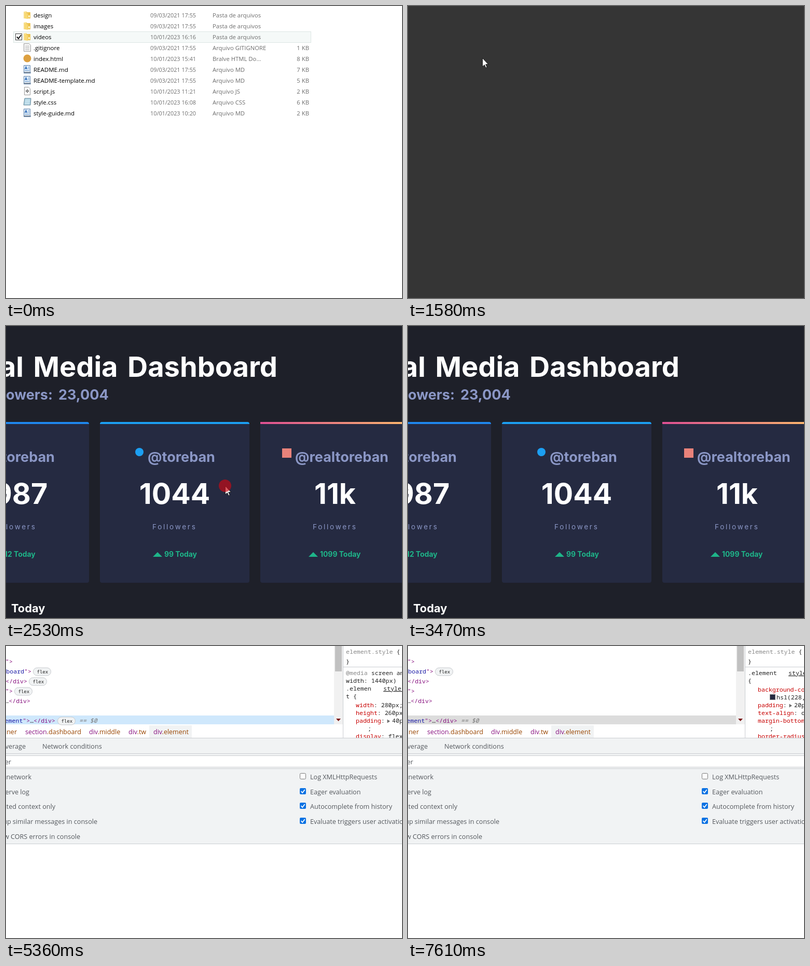
These frames come from a looping animation (763 px wide and 563 px high, 8 s). An HTML page:

```html
<!DOCTYPE html>
<html lang="en">
<head>
<meta charset="utf-8">
<title>Opening a page and its inspector</title>
<style>
html, body { margin: 0; width: 100%; height: 100%; overflow: hidden; background: #fff; }
svg { display: block; }
text { white-space: pre; font-family: "Open Sans", "Noto Sans", sans-serif; }
.name { font-size: 11.5px; }
.date { font-size: 10.85px; fill: #6d6d6d; }
.kind { font-size: 11.3px; fill: #6d6d6d; }
#page text { font-family: Inter, sans-serif; font-weight: 700; fill: #fff; }
#page .title { font-size: 54.2px; }
#page .big { font-size: 55.5px; }
#page .handle { font-size: 27px; fill: #8b97c6; }
#page .label { font-size: 13.5px; font-weight: 400; letter-spacing: 2.75px; fill: #8b97c6; }
#page .up { font-size: 13.9px; fill: #1eb589; }
#page .sub { font-size: 21.8px; }
.item { font-size: 12.2px; fill: #222; }
.ui { font-size: 12.6px; fill: #55595e; }
.crumb { font-size: 12.5px; }
#dev .code { font: 11.6px "Noto Sans Mono", "DejaVu Sans Mono", monospace; fill: #222; }
#dev .pill { font: 9px "DejaVu Sans Mono", monospace; fill: #222; }
#dev .ref { fill: #777; font-style: italic; }
#dev .dim { fill: #888; }
.tag { fill: #881280; }
.val { fill: #1a1aa6; }
.cls { fill: #994500; }
.prop { fill: #c80000; }
.end { text-anchor: end; }
.mid { text-anchor: middle; }
</style>
</head>
<body>
<svg id="stage" width="763" height="563" viewBox="0 0 763 563"></svg>
<script>
const LOOP = 8000;
const stage = document.getElementById('stage');
const text = (x, y, s, cls) => `<text x="${x}" y="${y}" class="${cls}">${s}</text>`;
const rect = (x, y, w, h, fill, more = '') =>
  `<rect x="${x}" y="${y}" width="${w}" height="${h}" fill="${fill}" ${more}/>`;
const span = (cls, s) => `<tspan class="${cls}">${s}</tspan>`;
const group = (id, s) => `<g id="${id}">${s}</g>`;
const line = (y, x = 0, w = 763) => rect(x, y, w, 1, '#cacdd1');

// File list
const icons = {
  dir: '<path d="M1 2l6-1v14H1z" fill="#f8df8d"/><path d="M6 3h8v12H6z" fill="#ecc24f"/><path d="M3 4l6 1v11l-6-1z" fill="#f7d873"/><path d="M10 9h3v4h-3z" fill="#fff3c4"/>',
  txt: '<path d="M1.5 .5h10l3 3v12h-13z" fill="#f6f6f6" stroke="#9a9a9a"/><path d="M4 5h8M4 7.5h8M4 10h8M4 12.5h8" stroke="#b9b9b9"/>',
  web: '<circle cx="8" cy="8" r="7.5" fill="#dda03f"/>',
  md: '<path d="M1.5 .5h12v11l1 4h-13z" fill="#e4f0fb" stroke="#5a7fa8"/><path d="M3.5 8l2-5 2 5M4.3 6.5h2.5" fill="none" stroke="#2464b4" stroke-width="1.3"/><path d="M9 4h3M9 7h3M3 10.5h9" stroke="#5c8dc4"/><path d="M2 13h12v2H2z" fill="#87919c"/>',
  js: '<path d="M2.5 .5h8l3 3v12h-11z" fill="#fff" stroke="#999"/><path d="M8 5v6M5 8h6" stroke="#555" stroke-width="2"/><circle cx="8" cy="8" r="1" fill="#fff"/>',
  css: '<path d="M3 1h12l-1 13H1z" fill="#a8cfe0" stroke="#6a8b9c"/><path d="M4 4h9M4 6.5h9M3.5 9h9M3.5 11.5h9" stroke="#e6f5fb"/>'
};
const old = '09/03/2021 17:55', day = '10/01/2023 ';
const files = [
  ['dir', 'design', old, 'Pasta de arquivos', ''],
  ['dir', 'images', old, 'Pasta de arquivos', ''],
  ['dir', 'videos', day + '16:16', 'Pasta de arquivos', ''],
  ['txt', '.gitignore', old, 'Arquivo GITIGNORE', '1 KB'],
  ['web', 'index.html', day + '15:41', 'Bralve HTML Do...', '8 KB'],
  ['md', 'README.md', old, 'Arquivo MD', '7 KB'],
  ['md', 'README-template.md', old, 'Arquivo MD', '5 KB'],
  ['js', 'script.js', day + '11:21', 'Arquivo JS', '2 KB'],
  ['css', 'style.css', day + '16:08', 'Arquivo CSS', '6 KB'],
  ['md', 'style-guide.md', day + '10:20', 'Arquivo MD', '2 KB']
];
const rowY = i => 18 + 21 * i;
const fileRow = ([icon, name, date, kind, size], i) => {
  const y = rowY(i) + 4;
  return `<g transform="translate(33 ${y - 13})">${icons[icon]}</g>` + text(53, y, name, 'name') +
    text(278, y, date, 'date') + text(398, y, kind, 'kind') + text(584, y, size, 'kind end');
};
const mark = (fill, edge, box, tick) =>
  rect(14.5, -10.5, 573, 21, fill, `stroke="${edge}"`) +
  rect(18.5, -6.5, 12, 12, '#fff', `stroke="${box}"`) +
  (tick ? `<path d="M21 -.5l3 3.5 5-7" fill="none" stroke="${tick}" stroke-width="2"/>` : '');
const place = (id, i, s) => `<g id="${id}" transform="translate(0 ${rowY(i)})">${s}</g>`;

const fileView = group('files',
  place('focus', 2, mark('#f5f9f8', '#dde6e4', '#444', '#111')) +
  place('hover', 4, mark('#e5f3fb', '#70c0e7', '#8fb4d0')) +
  place('chosen', 4, mark('#d0e7fe', '#66a7e8', '#3c7fb1', '#2a5c8f')) +
  files.map(fileRow).join(''));

// Dashboard
const card = (x, bar, handle, hx, total, todayX, today, r = 4) => {
  const cx = x + 144;
  return rect(x, 185, 288, 310, '#252a41', 'rx="4"') +
    `<path d="M${x} 189v-${4 - r}q0-${r} ${r}-${r}h${288 - 2 * r}q${r} 0 ${r} ${r}v${4 - r}z" fill="${bar}"/>` +
    text(hx, 262, handle, 'handle mid') + text(cx, 343, total, 'big mid') +
    text(cx - 43, 392, 'Followers', 'label') +
    `<path d="M${todayX - 22} 445l9-9 9 9z" fill="#1eb589"/>` + text(todayX, 445, today + ' Today', 'up');
};
const pageView = group('page',
  '<linearGradient id="warm" gradientUnits="userSpaceOnUse" x1="490" x2="778"><stop stop-color="#df4f93"/><stop offset="1" stop-color="#fdbb6c"/></linearGradient>' +
  rect(0, 0, 763, 563, '#1e2029') +
  text(34, 98, 'Social', 'title end') + text(51 + 2, 98, 'Media', 'title').replace('53', '52.5') + text(234, 98, 'Dashboard', 'title') +
  text(90, 142, 'Total Followers:', 'handle end') + text(101, 142, '23,004', 'handle') +
  card(-128, '#1f87ee', '@toreban', 29, '1987', -3, '12') +
  card(181, '#1c9ff2', '@toreban', 338, '1044', 305, '99') +
  card(490, 'url(#warm)', '@realtoreban', 647, '11k', 605, '1099', 0) +
  '<circle cx="257" cy="243" r="8" fill="#1c9ff2"/>' + rect(532, 236, 18, 18, '#e9827a') +
  text(10, 552, 'Today', 'sub'));

const items = ['Voltar', 'Avançar', 'Recarregar', 'Salvar como...', 'Imprimir...',
  'Transmitir...', 'Traduzir para o português', 'Ver código-fonte da página', 'Inspecionar', ''];
const menuView = group('menu',
  rect(422.5, 308.5, 380, 300, '#fff', 'stroke="#bababa"') + rect(423, 0, 379, 24, '#e8e8e9', 'id="pick"') +
  items.map((s, i) => text(456, 330 + 25 * i, s, 'item')).join(''));

// Inspector
const badge = (x, y) => rect(x - .5, y - 7, 34, 15, '#f1f3f4', 'rx="7.5" stroke="#c6c9cd"') +
  text(x + 6.5, y + 4, 'flex', 'pill');
const close = span('tag', '&lt;/div&gt;'), quote = span('tag', '"&gt;');
const code = (x, y, s, cls = '') => text(x, y, s, 'code ' + cls);
const prop = (y, name, value = '') => code(674, y, span('prop', name) + value);
const arrow = y => `<path d="M734.5 ${y - 7}v7l5.5-3.5z" fill="#6e6e6e"/>`;
const crumb = (x, tag, cls) => text(x, 170, span('tag', tag) + span('cls', cls), 'crumb');
const check = (y, on) => on
  ? rect(566, y - 6, 12, 12, '#0b72e3', 'rx="2"') + `<path d="M568.5 ${y}l2.7 3 4.5-6" fill="none" stroke="#fff" stroke-width="1.8"/>`
  : rect(566.5, y - 5.5, 11, 11, '#fff', 'rx="2" stroke="#767676"');
const options = [
  ['Hide network', 49, 'Log XMLHttpRequests'],
  ['Preserve log', 45, 'Eager evaluation'],
  ['Selected context only', 95, 'Autocomplete from history'],
  ['Group similar messages in console', 176, 'Evaluate triggers user activation'],
  ['Show CORS errors in console', 143, '']
];
const drawer =
  rect(0, 178, 763, 204, '#f1f3f4') + rect(0, 212, 763, 22, '#fff') +
  line(177) + line(207) + line(211) + line(233) + line(236) + line(381) +
  text(38, 198, 'Coverage', 'ui end') + text(70, 198, 'Network conditions', 'ui') +
  text(10, 228, 'Filter', 'ui end') +
  options.map(([left, x, right], i) => {
    const y = 257 + Math.round(28.7 * i);
    return text(x, y, left, 'ui end') + (right && text(586, y, right, 'ui') + check(y - 6, i > 0));
  }).join('');
const tree =
  rect(0, 134, 632, 17, '#cfe8fc', 'id="row"') +
  code(13, 34, quote, 'end') +
  code(49, 53, span('val', 'board') + quote, 'end') +
  code(41, 72, close, 'end') + code(13, 91, quote, 'end') +
  code(47, 110, '…' + close, 'end') +
  code(95, 148, span('val', 'ement') + quote + '…' + close, 'end') +
  group('ref', code(0, 148, '== $0', 'ref')) +
  rect(632, 0, 17, 151, '#f1f1f1') + rect(634, 0, 13, 49, '#c1c1c1') +
  '<path d="M636 140h9l-4.5 5z" fill="#7a1515"/>' +
  rect(276, 153, 82, 24, '#f1f3f4') +
  text(21, 170, 'container', 'crumb cls end') + crumb(37, 'section', '.dashboard') +
  crumb(160, 'div', '.middle') + crumb(236, 'div', '.tw') + crumb(284, 'div', '.element');
const link = '<tspan text-decoration="underline">style.css</tspan>';
const styleHead = code(655, 15, span('dim', 'element.style') + ' {') + code(655, 34, '}') + line(40, 650, 113);
const wideRule =
  code(655, 56, span('dim', '@media') + ' screen and (min-') + code(655, 71, 'width: 1440px)') +
  code(655, 86, '.elemen') + code(727, 86, link) + code(655, 101, 't {') +
  prop(118, 'width', ': 280px;') + prop(133, 'height', ': 260px;') + prop(148, 'padding', ':') +
  arrow(148.5) + code(744, 148, '40px') + code(697, 163, ';') + prop(178, 'display', ': flex;');
const baseRule =
  code(655, 56, '.element') + code(733, 56, link) + code(655, 71, '{') +
  prop(88, 'background-color', ':') + rect(697.5, 93.5, 10, 10, '#252a41', 'stroke="#777"') +
  code(710, 103, 'hsl(228, 28%, 20%);') + prop(118, 'padding', ':') + arrow(118.5) +
  code(744, 118, '20px') + prop(133, 'text-align', ': center;') + prop(148, 'margin-bottom', ':') +
  code(697, 163, ';') + prop(178, 'border-radius', ':');
const devView = group('dev',
  rect(0, 0, 763, 563, '#fff') +
  group('tree', tree) + group('pill', badge(53, 49)) +
  group('pills', badge(45, 68) + badge(17, 87) + badge(100, 144)) +
  group('head', styleHead) + group('wide', wideRule) + group('base', baseRule) +
  rect(649, 0, 1, 177, '#cacdd1') + group('drawer', drawer));

stage.innerHTML = fileView + group('dark', rect(0, 0, 763, 563, '#353535')) + pageView + menuView + devView +
  group('cursor', '<path d="M.5 .5V17l3.8-3.5 2.6 5.7 2.3-1-2.5-5.7h5z" fill="#fff" stroke="#111" stroke-width=".9"/>') +
  '<circle id="click" r="12" fill="#c80a14" fill-opacity=".68"/>';

const el = {};
stage.querySelectorAll('[id]').forEach(n => el[n.id] = n);
const show = (id, on) => el[id].style.display = on ? '' : 'none';
const move = (id, x, y) => el[id].setAttribute('transform', `translate(${x} ${y})`);

// Pointer routes: time, x, y
const routes = [
  [[130, 617, 482], [340, 430, 330], [550, 230, 155], [690, 150, 103], [760, 143, 100], [1710, 143, 100],
   [1970, 302, 18], [2180, 302, 18]],
  [[2180, 302, 18], [2460, 396, 185], [2530, 422, 308], [2600, 422, 308], [3010, 472, 570]],
  [[4350, 560, 572], [4700, 502, 550], [5010, 502, 550], [5150, 506, 572]]
];
function pointer(t) {
  for (const r of routes) {
    const first = r[0][0];
    if (t < first || t >= r[r.length - 1][0]) continue;
    const s = first + Math.floor((t - first) / 70) * 70;
    const i = r.findIndex(p => p[0] > s), [ta, xa, ya] = r[i - 1], [tb, xb, yb] = r[i];
    const k = (s - ta) / (tb - ta);
    return [Math.round(xa + (xb - xa) * k), Math.round(ya + (yb - ya) * k)];
  }
  return null;
}

function draw(t) {
  const within = (a, b) => t >= a && t < b;
  const p = pointer(t);
  const [x, y] = p || [0, 0];

  show('files', t < 1580);
  show('focus', t < 1240);
  show('chosen', t >= 1240);
  const row = Math.round((y - 18) / 21);
  const over = p && t < 1240 && x < 588 && row < files.length;
  show('hover', over);
  if (over) move('hover', 0, rowY(row));

  show('dark', within(1450, 1840));
  el.dark.style.opacity = t < 1510 ? .5 : t < 1580 ? .85 : 1;
  show('page', within(1840, 4080));
  show('menu', within(2600, 3470));
  const item = t < 3010 ? Math.floor((y - 313) / 25) : 99;
  show('pick', item >= 0);
  el.pick.setAttribute('y', 314 + 25 * item);

  show('dev', t >= 4080);
  show('drawer', t >= 4150);
  show('tree', t >= 4350);
  show('pill', t >= 5150);
  show('pills', within(5150, 7540));
  show('head', t >= 5220);
  show('wide', within(5290, 7610));
  show('base', t >= 7610);
  el.row.setAttribute('fill', t < 7080 ? '#cfe8fc' : '#dcdcdc');
  move('ref', within(5150, 7540) ? 141 : 102, 0);

  show('cursor', p);
  move('cursor', x, y);
  show('click', within(1090, 1240) || within(1310, 1380) || within(2530, 2600));
  move('click', x, y);
}

const start = performance.now();
function frame() {
  draw((performance.now() - start) % LOOP);
  requestAnimationFrame(frame);
}
frame();
</script>
</body>
</html>
```
